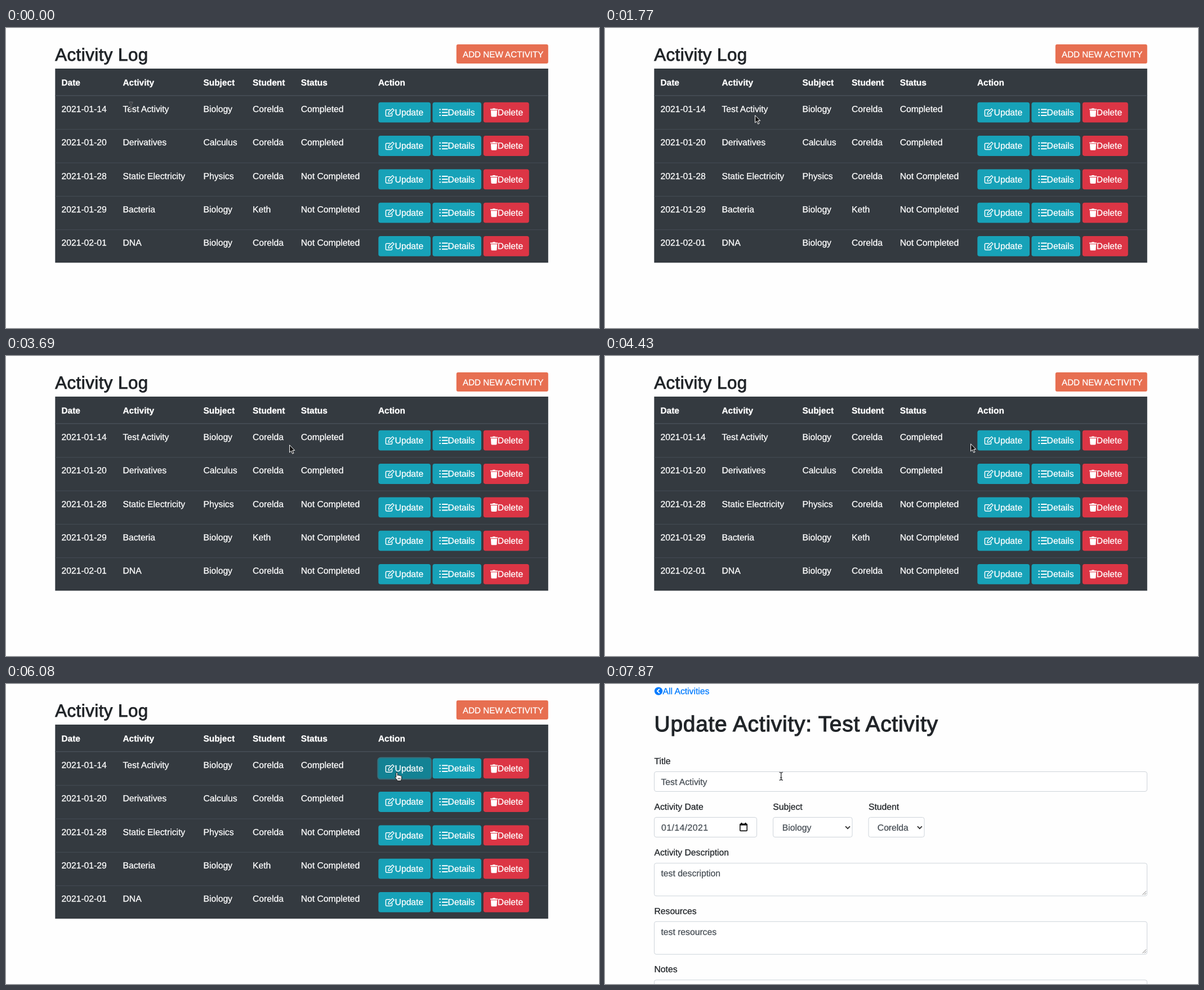
Recreate the animation shown at these times as an HTML page. Size 1053 by 532 pixels, loop 8 s.

```html
<!DOCTYPE html>
<html lang="en">
<head>
<meta charset="utf-8">
<title>Activity Log</title>
<style>
  html, body { margin: 0; width: 100%; height: 100%; overflow: hidden; background: #fefefe; }
  svg { display: block; width: 1053px; height: 532px; }
  text { font: 15.7px "Liberation Sans", Arial, sans-serif; stroke-width: .3; white-space: pre; text-rendering: geometricPrecision; }
  .head { font-size: 15.4px; font-weight: 700; }
</style>
</head>
<body>
<svg viewBox="0 0 1053 532">
  <defs>
    <g id="edit" fill="none" stroke="#fff" stroke-width="1.5">
      <path d="M9 2.7H2.5q-1.6 0-1.6 1.6V12.3q0 1.6 1.6 1.6H10.5q1.6 0 1.6-1.6V8.6"/>
      <path d="M5.9 7.4L12.9.7L15.6 3.4L8.7 10.2L5.4 10.6Z" stroke-width="1.3"/>
    </g>
    <path id="list" fill="none" stroke="#fff" stroke-width="2" d="M0 2H2.4M4.6 2H15M0 7.3H2.4M4.6 7.3H15M0 12.6H2.4M4.6 12.6H15"/>
    <path id="trash" fill="#fff" d="M0 1H3.8L4.6 0H8.4L9.2 1H13V2.9H0ZM.9 3.9H12.1L11.5 13.6Q11.4 15 10 15H3Q1.6 15 1.5 13.6Z"/>
    <path id="grip" fill="none" stroke="#777" d="M-8-2L-1.5-8.5M-4.5-2L-1.5-5"/>
    <path id="chevron" fill="none" stroke="#333" stroke-width="1.9" d="M0 0L4 4L8 0"/>
  </defs>
  <g id="log"></g>
  <g id="form"></g>
  <g id="pointer">
    <path id="arrow" fill="#111" stroke="#fff" d="M.5 .8V14L3.5 11.2L5.7 16.3L7.9 15.3L5.7 10.4H9.7Z"/>
    <g id="beam" fill="none">
      <path stroke="#fff" stroke-opacity=".45" stroke-width="2.4" d="M-3.3-7Q0-7 0-5Q0-7 3.3-7M0-5V5M-3.3 7Q0 7 0 5Q0 7 3.3 7M-1.8 2.5H1.8"/>
      <path stroke="#1b1d20" stroke-width="1.2" d="M-3.3-7Q0-7 0-5Q0-7 3.3-7M0-5V5M-3.3 7Q0 7 0 5Q0 7 3.3 7M-1.8 2.5H1.8"/>
    </g>
    <g id="hand" stroke="#111" stroke-linejoin="round" transform="translate(-3.9 -1)">
      <path fill="#fff" d="M2.6 9.5V2.2a1.3 1.3 0 0 1 2.6 0V6.3c.3-1 2.4-1 2.6.3c.5-.8 2.3-.6 2.5.6c.6-.7 2.2-.3 2.2 1V11c0 2-1.2 2.6-1.4 4.7H5C4.6 13.6 2.6 12.4.8 9.8C.2 8.3 1.6 7.7 2.6 9.5Z"/>
      <path stroke-width=".8" d="M6.2 10.5V13.3M8 10.5V13.3M9.8 10.5V13.3"/>
    </g>
  </g>
</svg>
<script>
const $ = id => document.getElementById(id);
const text = (x, y, s, fill = '#fff', attrs = '') =>
  `<text x="${x}" y="${y}" fill="${fill}" stroke="${fill}" ${attrs}>${s}</text>`;
const rect = (x, y, w, h, fill, attrs = '') => `<rect x="${x}" y="${y}" width="${w}" height="${h}" fill="${fill}" ${attrs}/>`;
const use = (id, x, y) => `<use href="#${id}" x="${x}" y="${y}"/>`;
const heading = (x, y, s, size, spacing, weight) => text(x, y, s, '#212529',
  `style="font-size:${size}px;letter-spacing:${spacing}px;stroke-width:${weight}"`);

const INFO = '#17a2b8', DANGER = '#dc3545';
const columns = [98.5, 207.5, 350.5, 438, 523.7, 661];
const rows = [
  ['2021-01-14', 'Test Activity', 'Biology', 'Corelda', 'Completed'],
  ['2021-01-20', 'Derivatives', 'Calculus', 'Corelda', 'Completed'],
  ['2021-01-28', 'Static Electricity', 'Physics', 'Corelda', 'Not Completed'],
  ['2021-01-29', 'Bacteria', 'Biology', 'Keth', 'Not Completed'],
  ['2021-02-01', 'DNA', 'Biology', 'Corelda', 'Not Completed'],
];

function button(x, y, w, fill, icon, iconX, label, labelX, attrs = '') {
  return rect(x, y, w, 35.8, fill, 'rx="3.8" ' + attrs) + use(icon, iconX, y + 10.6) + text(labelX, y + 23.3, label);
}

function buildLog() {
  let out = heading(87.2, 58, 'Activity Log', 31.2, .5, .9)
    + rect(799.8, 29, 163, 34, '#e76f51', 'rx="3"')
    + text(811, 51.7, 'ADD NEW ACTIVITY', '#fff', 'style="font-size:15.2px"')
    + rect(87.3, 72, 875.5, 344.2, '#343a40')
    + rect(87.3, 119, 875.5, 1.7, '#454d55');
  ['Date', 'Activity', 'Subject', 'Student', 'Status', 'Action'].forEach((s, i) => {
    out += text(columns[i], 101.8, s, '#fff', 'class="head"');
  });
  rows.forEach((row, r) => {
    const y = r * 59.3;
    if (r) out += rect(87.3, 120 + y, 875.5, 1, '#454d55');
    row.forEach((s, i) => out += text(columns[i], 149 + y, s));
    out += button(661.3, 131.8 + y, 92.7, INFO, 'edit', 673.5, 'Update', 690.6, r ? '' : 'id="update"')
      + button(757.5, 131.8 + y, 86.5, INFO, 'list', 769.5, 'Details', 784.6)
      + button(847.8, 131.8 + y, 81, DANGER, 'trash', 860, 'Delete', 872.8);
  });
  return out;
}

function buildForm() {
  const label = (x, y, s) => text(x, y, s, '#212529');
  const value = (x, y, s, attrs) => text(x, y, s, '#495057', attrs);
  const field = (x, y, w, h) => rect(x, y, w, h, '#fff', 'rx="3.5" stroke="#ced4da"');
  const area = (y, h) => field(87.5, y, 875, h) + use('grip', 962.5, y + h);
  return text(87.5, 17.8, 'All Activities', '#007bff', 'id="link"')
    + '<g id="back"><circle cx="95" cy="12.6" r="7.2" fill="#007bff"/>'
    + '<path d="M96.8 8.8L93 12.6L96.8 16.4" fill="none" stroke="#fff" stroke-width="2"/></g>'
    + heading(87.6, 84, 'Update Activity: Test Activity', 38.8, .8, 1.15)
    + label(87.5, 142.3, 'Title') + field(87.5, 155.5, 875, 35) + value(99.5, 179, 'Test Activity')
    + label(87.5, 223.3, 'Activity Date') + field(87.5, 236.5, 182, 35)
    + value(100, 259.8, '01/14/2021', 'style="letter-spacing:.5px"')
    + rect(239.8, 248.2, 12.4, 12.2, 'none', 'rx="1" stroke="#111" stroke-width="1.6"')
    + '<path d="M239.5 249.5H252.5M242.5 246V249M249.5 246V249" stroke="#111" stroke-width="2.4"/>'
    + label(298.3, 223.3, 'Subject') + field(298.5, 236.5, 140.5, 35)
    + value(314.8, 259.8, 'Biology') + use('chevron', 427, 252.3)
    + label(468, 223.3, 'Student') + field(468, 236.5, 99, 35)
    + value(483.8, 259.8, 'Corelda') + use('chevron', 554.8, 252.3)
    + label(87.5, 304.3, 'Activity Description') + area(317.8, 58) + value(99.5, 341, 'test description')
    + label(87.5, 407.8, 'Resources') + area(421.3, 58) + value(99.5, 444.5, 'test resources')
    + label(87.5, 511.3, 'Notes') + area(524.8, 58);
}

// Pointer legs: first step, last step, step count, end x, end y, shape
const legs = [
  [0, 0, 1, 222, 139, 'beam'],
  [150, 150, 1, 198, 145, 'arrow'],
  [300, 300, 1, 175, 149, 'beam'],
  [450, 450, 1, 154, 153, 'arrow'],
  [750, 1040, 3, 196, 152, 'arrow'],
  [1190, 1620, 4, 252, 151, 'beam'],
  [1770, 1770, 1, 266, 154, 'arrow'],
  [1920, 2650, 6, 379, 155, 'arrow'],
  [2950, 2950, 1, 389, 155, 'arrow'],
  [3100, 3540, 4, 480, 158, 'arrow'],
  [3690, 3990, 3, 549, 155, 'arrow'],
  [4130, 4430, 3, 649, 155, 'arrow'],
  [4580, 4880, 3, 694, 157, 'hand'],
  [7270, 7420, 2, 540, 142, 'arrow'],
  [7570, 7720, 2, 372, 152, 'arrow'],
  [7870, 7870, 1, 312.7, 163.5, 'beam'],
];

function pointerAt(t) {
  const i = legs.findLastIndex(leg => leg[0] <= t);
  const [start, end, count, x, y, shape] = legs[i];
  const [, , , fromX, fromY] = legs[Math.max(0, i - 1)];
  const gap = (end - start) / (count - 1) || 1;
  const u = Math.min(count, Math.floor((t - start) / gap + 1.001)) / count;
  return { x: fromX + (x - fromX) * u, y: fromY + (y - fromY) * u, shape };
}

$('log').innerHTML = buildLog();
$('form').innerHTML = buildForm();
const show = (id, on) => $(id).setAttribute('display', on ? 'inline' : 'none');
const set = (id, attrs) => { for (const k in attrs) $(id).setAttribute(k, attrs[k]); };
set('update', { 'stroke-width': 4, 'paint-order': 'stroke' });

function draw(now) {
  const t = now % 8000;
  const pressed = t >= 6080, onForm = t >= 6220, hasIcon = t >= 6370;
  show('log', !onForm);
  show('form', onForm);
  show('back', hasIcon);
  set('link', { x: hasIcon ? 102.5 : 87.5 });
  set('update', {
    fill: pressed ? '#138294' : t >= 4580 ? '#138496' : INFO,
    stroke: pressed ? '#366f7c' : 'none',
  });
  const p = pointerAt(t);
  set('pointer', { transform: `translate(${p.x} ${p.y})` });
  for (const s of ['arrow', 'beam', 'hand']) show(s, s === p.shape);
}

const began = performance.now();
function tick() {
  draw(performance.now() - began);
  requestAnimationFrame(tick);
}
tick();
</script>
</body>
</html>
```
